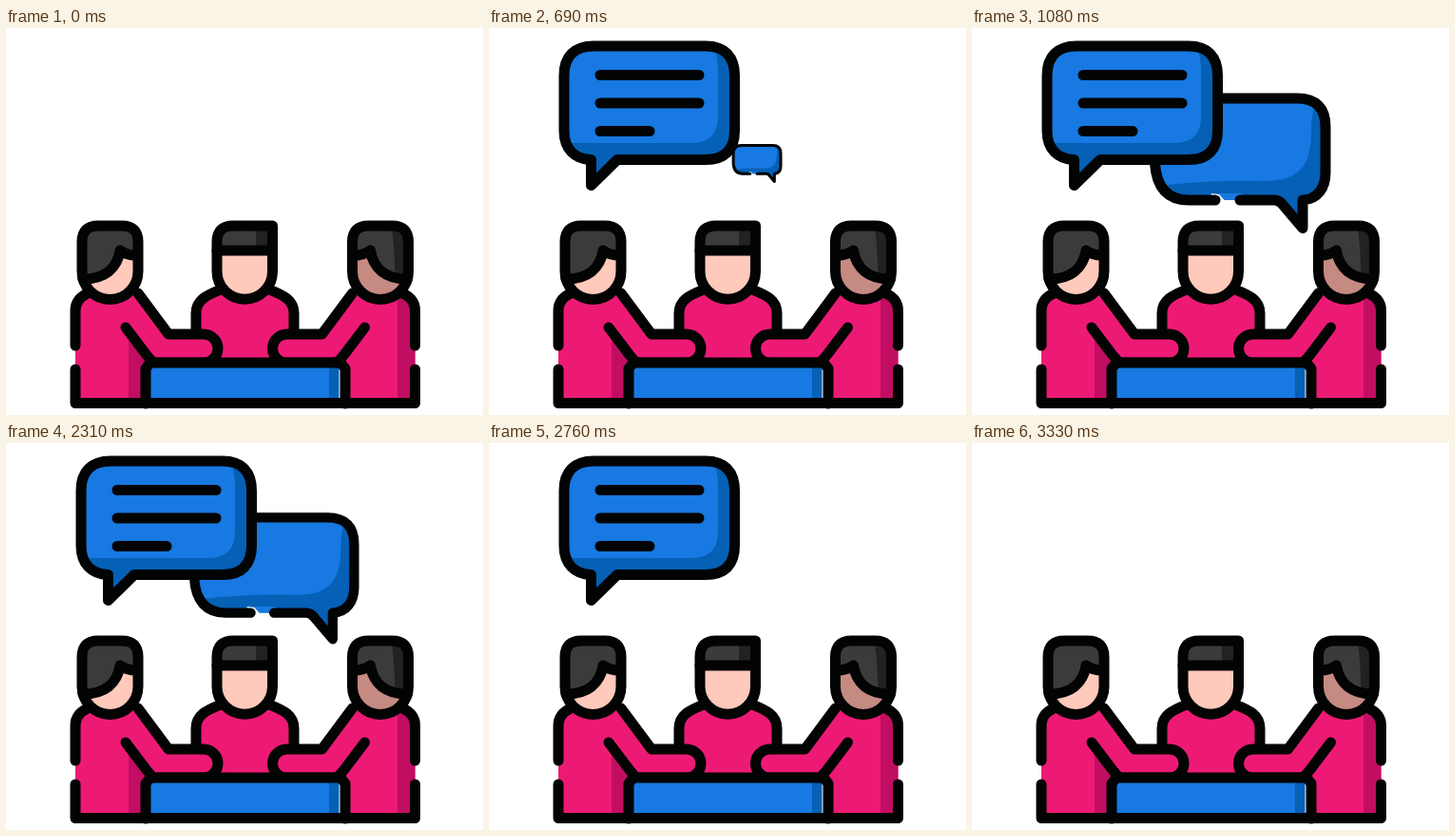
An HTML page with a canvas for the animation above (3.6 s loop, 502 by 407 pixels).

```html
<!DOCTYPE html>
<html lang="en">
<head>
<meta charset="utf-8">
<title>Meeting</title>
<style>
  html, body { margin: 0; width: 100%; height: 100%; overflow: hidden; background: #fff; }
  canvas { display: block; }
</style>
</head>
<body>
<canvas id="stage" width="502" height="407"></canvas>
<script>
const ctx = document.getElementById('stage').getContext('2d');
const LOOP = 3600, STEP = 30, LINE = 11;
const INK = '#020303', BLUE = '#1779e1', NAVY = '#0560b6';
const PINK = '#ed1a75', PLUM = '#c10e62';
const HAIR = '#3b3b3b', HAIR_DARK = '#222', SKIN = '#ffc9bb', SKIN_DARK = '#c58a82';

const fill = (d, color) => { ctx.fillStyle = color; ctx.fill(new Path2D(d)); };
const stroke = (d, width = LINE) => {
  ctx.lineWidth = width;
  ctx.strokeStyle = INK;
  ctx.stroke(new Path2D(d));
};
const rect = (x, y, w, h, color) => { ctx.fillStyle = color; ctx.fillRect(x, y, w, h); };

function clipped(d, paint) {
  ctx.save();
  ctx.clip(new Path2D(d));
  paint();
  ctx.restore();
}

// The right-hand person is the left one mirrored, with its own shading.
const SIDE_BODY = 'M73 395V297Q73 285 86 279H139L171 322H208A15 15 0 0 1 208 352H147V395Z';
const SIDE_HEAD = 'M80 225Q80 208 97 208H122Q139 208 139 225V256A29.5 29.5 0 0 1 80 256Z';
const FRINGE = 'M81 264C104 264 117 253 120 234Q127 239 137 239';

function sidePerson(right) {
  ctx.save();
  if (right) {
    ctx.translate(503.5, 0);
    ctx.scale(-1, 1);
  }
  clipped(SIDE_BODY, () => {
    rect(60, 270, 180, 130, PINK);
    if (right) rect(70, 270, 21.5, 130, PLUM);
    else fill('M129 318L148 344V395H129Z', PLUM);
  });
  stroke('M73 334V297Q73 285 86 279M139 279L171 322H208A15 15 0 0 1 208 352H155L148 344L126 315');

  clipped(SIDE_HEAD, () => {
    rect(75, 200, 70, 90, right ? SKIN_DARK : SKIN);
    fill(FRINGE + 'L145 239V200H75V264Z', HAIR);
    if (right) fill('M75 200H100Q95 216 94 264H75Z', HAIR_DARK);
  });
  stroke(FRINGE);
  stroke(SIDE_HEAD);
  ctx.restore();
}

function middlePerson() {
  const body = 'M200 352V300C200 286 211 281 226 275H277C292 281 303 286 303 300V352';
  const head = 'M222 225Q222 208 239 208H280.5V256A29.25 29.25 0 0 1 222 256Z';
  fill(body, PINK);
  stroke(body);
  clipped(head, () => {
    rect(215, 200, 70, 90, SKIN);
    rect(215, 200, 70, 34, HAIR);
    rect(263, 200, 20, 34, HAIR_DARK);
  });
  stroke('M222 234H280.5');
  stroke(head);
}

function table() {
  rect(147, 352, 193, 43, BLUE);
  rect(340, 352, 10.5, 43, NAVY);
  stroke('M147 395V358L152 352H352L357 358V395');
  stroke('M73 359V394.5H430.5V359');
}

function textBubble() {
  const shape = 'M110 19H228C248 19 258.5 30 258.5 50V108C258.5 128 248 138.5 228 138.5'
    + 'H135L107.5 165.5V138.5C90 138 79 127 79 108V50C79 30 90 19 110 19Z';
  clipped(shape, () => {
    rect(70, 10, 200, 165, NAVY);
    fill('M70 10H232Q241 26 241 44V93Q241 121 213 121H70Z', BLUE);
  });
  stroke(shape);
  stroke('M117 49.5H221M117 79H221M117 108.5H169');
}

function plainBubble() {
  const edge = 'M282 181H318Q324 181 328 187L348 210.5V181C364 180 372 168 372 152'
    + 'V104C372 84 362 74 342 74H222C202 74 192.5 84 192.5 104V142C194 168 206 181 228 181';
  clipped(edge + 'Z', () => {
    rect(180, 60, 200, 160, NAVY);
    fill('M180 60H370Q357 82 357 108C357 146 344 161 306 161C270 160 235 161 180 168Z', BLUE);
    rect(250, 174, 34, 8, BLUE);
  });
  fill('M252 174L260 175L266 181.5H252Z', '#fff');
  stroke(edge + 'H256');
}

function scaled(paint, x, y, size) {
  if (size <= 0) return;
  ctx.save();
  ctx.translate(x, y);
  ctx.scale(size, size);
  ctx.translate(-x, -y);
  paint();
  ctx.restore();
}

// Linear growth from `start` over `grow`, linear shrink from `end` over `shrink`.
const pop = (t, start, grow, end, shrink) =>
  Math.max(0, Math.min(1, (t - start) / grow, 1 - (t - end) / shrink));

function draw(t) {
  rect(0, 0, 502, 407, '#fff');
  ctx.lineCap = ctx.lineJoin = 'round';
  scaled(plainBubble, 282, 142.5, pop(t, 540, 540, 2280, 480));
  scaled(textBubble, 169, 92.5, pop(t, 0, 420, 2910, 420));
  middlePerson();
  sidePerson(false);
  sidePerson(true);
  table();
}

const begin = performance.now();
function tick() {
  const t = (performance.now() - begin) % LOOP;
  draw(Math.floor(t / STEP) * STEP);
  requestAnimationFrame(tick);
}
tick();
</script>
</body>
</html>
```
